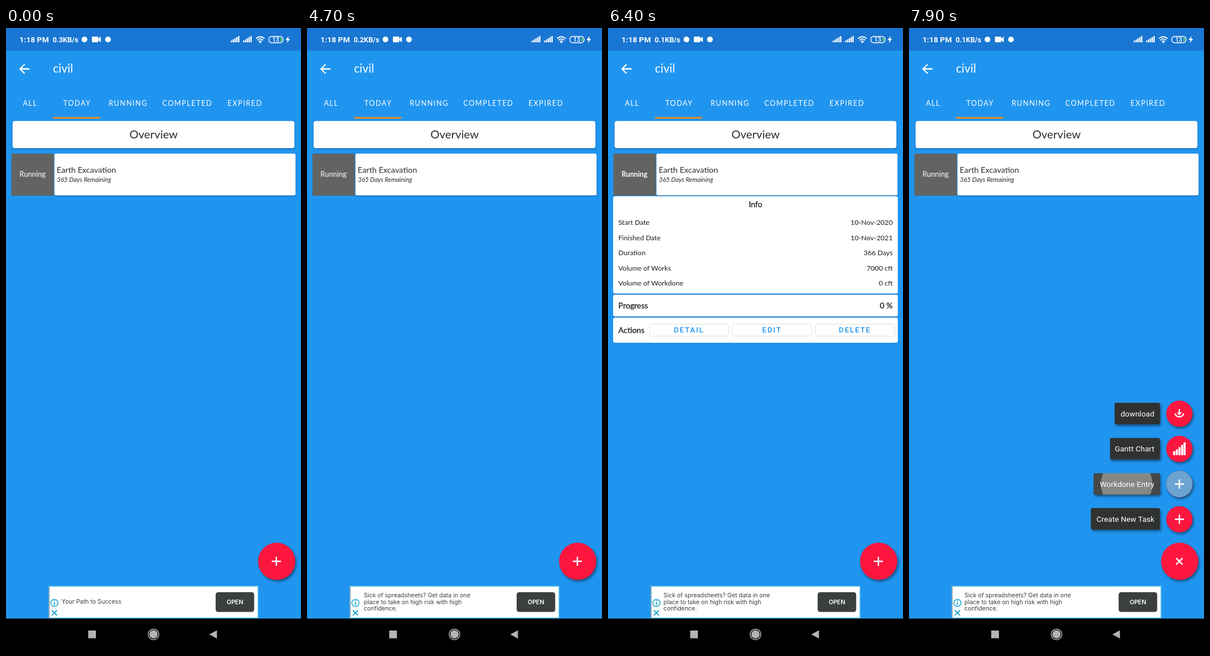
An HTML page that plays this animation: 515 px wide and 1087 px high, repeating every 8 s.

```html
<!DOCTYPE html>
<html lang="en">
<head>
<meta charset="utf-8">
<title>Task list</title>
<style>
html, body { margin: 0; width: 100%; height: 100%; overflow: hidden; background: #2095f0; }
svg, .panel { position: absolute; left: 0; top: 0; }
svg { width: 515px; height: 1087px; display: block; }
text, .panel { font-family: Lato, sans-serif; }
.roboto, .panel button { font-family: Roboto, sans-serif; }
.ad text { font: 10.4px Inter, sans-serif; fill: #3c3f3e; }
.mid { text-anchor: middle; }
.end { text-anchor: end; }
.tabs text { font-size: 12.5px; letter-spacing: 1.4px; fill: #fff; }
.line { fill: none; stroke: #fff; }
.card { fill: #fefffe; filter: drop-shadow(0 1px 1px rgba(0,30,80,.5)); }
.raised { filter: drop-shadow(2px 3px 2px rgba(0,0,0,.45)); }
.red { fill: #fd173f; }

/* every track shares one 8 s clock */
.run { animation: 8s linear infinite; }
.speed-a { animation-name: speedA; }
.speed-b { animation-name: speedB; }
.speed-c { animation-name: speedC; }
.idle { animation-name: idle; }
.active { animation-name: active; }
.slide { animation-name: slide; }
.menu { animation-name: menu; }
.turn { animation-name: turn; transform-box: fill-box; transform-origin: center; }
.pop { animation-name: pop; transform-box: fill-box; transform-origin: center; }
.tag { animation-name: tag; }
.press { animation-name: press; }
.ripple { animation-name: ripple; }
.item:nth-child(2) .run { animation-delay: 50ms; }
.item:nth-child(3) .run { animation-delay: 100ms; }
.item:nth-child(4) .run { animation-delay: 150ms; }
.item .run { animation-fill-mode: backwards; }

@keyframes speedA { 0%, 11.24% { opacity: 1 } 11.25%, 100% { opacity: 0 } }
@keyframes speedB { 0%, 11.24% { opacity: 0 } 11.25%, 61.24% { opacity: 1 } 61.25%, 100% { opacity: 0 } }
@keyframes speedC { 0%, 61.24% { opacity: 0 } 61.25%, 100% { opacity: 1 } }
@keyframes idle { 0%, 60.62% { opacity: 1 } 60.63%, 83.12% { opacity: 0 } 83.13%, 100% { opacity: 1 } }
@keyframes active { 0%, 60.62% { opacity: 0 } 60.63%, 83.12% { opacity: 1 } 83.13%, 100% { opacity: 0 } }
@keyframes slide {
  0%, 52.5% { transform: none; animation-timing-function: cubic-bezier(.25,1,.5,1) }
  61.25%, 100% { transform: translateX(-267px) }
}
@keyframes unfold {
  0%, 60.625% { height: 0; animation-timing-function: cubic-bezier(.37,0,.63,1) }
  64.375%, 79.375% { height: 275px; animation-timing-function: cubic-bezier(.37,0,.63,1) }
  83.125%, 100% { height: 0 }
}
@keyframes menu { 0%, 87.49% { visibility: hidden } 87.5%, 100% { visibility: visible } }
@keyframes turn {
  0%, 87.5% { transform: none; animation-timing-function: cubic-bezier(.3,1.3,.6,1.2) }
  91.25%, 100% { transform: rotate(-135deg) }
}
@keyframes pop {
  0%, 87.5% { transform: scale(0); animation-timing-function: cubic-bezier(.3,1.2,.6,1.1) }
  90%, 100% { transform: none }
}
@keyframes tag {
  0%, 87.5% { transform: translateX(40px); opacity: 0; animation-timing-function: ease-out }
  90%, 100% { transform: none; opacity: 1 }
}
@keyframes press { 0%, 95.5% { opacity: 0 } 96.5%, 100% { opacity: 1 } }
@keyframes ripple {
  0%, 95.6% { r: 8px; opacity: 0 }
  96.4% { opacity: 1 }
  98.75% { r: 45px; opacity: 1 }
  100% { r: 52px; opacity: 1 }
}

.panel {
  left: 9px; top: 294px; width: 497px; height: 0; overflow: hidden;
  display: flex; flex-direction: column; gap: 2px;
  font-size: 12.2px; color: #1c1e1c; background: #1b7fd2; border-radius: 3px;
  animation: unfold 8s linear infinite;
}
.panel > div { box-sizing: border-box; background: #fefffe; border-radius: 3px; flex: none; }
.info { height: 170px; padding: 0 9px; }
.info h2 { margin: 0 0 4px; font: 13.6px/29px Lato, sans-serif; text-align: center; }
.panel h2, .panel b { -webkit-text-stroke: .3px; }
.info p { margin: 0; display: flex; justify-content: space-between; line-height: 26.5px; }
.panel b { font-weight: 400; font-size: 13.8px; }
.panel .progress { height: 37.5px; padding: 0 9px; display: flex; align-items: center; justify-content: space-between; }
.panel .actions { flex: 1 1 0; min-height: 0; padding: 11px 5px 11px 9px; display: flex; align-items: stretch; gap: 5px; overflow: hidden; }
.actions b { width: 48.5px; align-self: center; }
.actions button {
  flex: 1; min-width: 0; padding: 0; box-sizing: border-box;
  border: 1.5px solid #dcdedc; border-radius: 5px; background: none;
  color: #2095f0; font-size: 13px; font-weight: 500; letter-spacing: 1.8px;
}
</style>
</head>
<body>
<svg viewBox="0 0 515 1087">
  <defs>
    <path id="bars" d="M1.5 25v-3M4.7 25v-5M7.9 25v-7M11.1 25v-9M14.3 25v-11" stroke="#fff" stroke-width="2.3"/>
    <path id="plus" d="M-8 0H8M0-8V8" class="line" stroke-width="2.4"/>
    <clipPath id="adClip"><rect x="94" y="978" width="267" height="51"/></clipPath>
    <clipPath id="tagClip"><rect x="322.5" y="778" width="115.5" height="37.5" rx="3"/></clipPath>
  </defs>

  <rect width="515" height="1087" fill="#2095f0"/>
  <rect width="515" height="39.5" fill="#1976d2"/>

  <g class="roboto" fill="#fff" font-weight="700">
    <text class="roboto" x="23.5" y="25" font-size="13.6">1:18 PM</text>
    <g font-size="12.4">
      <text class="roboto run speed-a" x="81.5" y="25">0.3KB/s</text>
      <text class="roboto run speed-b" x="81.5" y="25">0.2KB/s</text>
      <text class="roboto run speed-c" x="81.5" y="25">0.1KB/s</text>
    </g>
    <circle cx="137" cy="20" r="5"/>
    <circle cx="178" cy="20" r="5"/>
    <path d="M151 15h9q1 0 1 1v2.5l4.500-3.500v10l-4.500-3.500V24q0 1-1 1h-9q-1 0-1-1v-8q0-1 1-1z"/>
    <use href="#bars" x="392"/>
    <use href="#bars" x="413.5"/>
    <path class="line" stroke-width="1.7" d="M436.500 18.500q7.500-6.500 15 0M439 21.300q5-4.300 10 0M441.400 23.800q2.600-2.200 5.200 0"/>
    <circle cx="444" cy="25.300" r="1.300"/>
    <rect class="line" x="458.700" y="14.700" width="25" height="11" rx="5" stroke-width="1.400"/>
    <path d="M479 17h1q2 1 2 3.200t-2 3.200h-1z" fill="#4ed35a"/>
    <text class="roboto mid" x="471" y="24" font-size="10.5" font-weight="500">13</text>
    <path d="M493.500 14l-5.500 7h3.500l-1.500 5.500 6-7.500h-3.500z"/>
  </g>

  <path class="line" stroke-width="2.300" d="M41 71.500H25M32.500 63.500l-8 8 8 8"/>
  <text x="82" y="78" font-size="20.5" fill="#fff">civil</text>
  <g class="tabs mid">
    <text x="42.200" y="135.500">ALL</text>
    <text x="124.200" y="135.500">TODAY</text>
    <text x="213.200" y="135.500">RUNNING</text>
    <text x="316.700" y="135.500">COMPLETED</text>
    <text x="417.200" y="135.500">EXPIRED</text>
  </g>
  <rect x="82" y="155.500" width="82.500" height="3" fill="#ee8a22"/>

  <rect class="card" x="11.500" y="162.500" width="492" height="47.500" rx="4"/>
  <text class="mid" x="257.700" y="193" font-size="19.8" fill="#2b2d2b">Overview</text>

  <rect x="9.500" y="219.500" width="74" height="73.500" fill="#626462"/>
  <rect class="card" x="84.500" y="219.500" width="421" height="73" rx="2.500"/>
  <g class="mid" fill="#fff">
    <text class="run idle" x="46.300" y="260" font-size="12.7">Running</text>
    <text class="run active" x="46.300" y="260" font-size="12.3" font-weight="700">Running</text>
  </g>
  <text x="88.500" y="253" font-size="14.1" fill="#2b2d2b">Earth Excavation</text>
  <text x="89" y="269" font-size="11" font-style="italic" fill="#2b2d2b">365 Days Remaining</text>

  <g class="ad">
    <rect x="75" y="975.500" width="365" height="55.500" fill="#fefffe" stroke="#58bfe6" stroke-width="1.500"/>
    <path d="M75.500 1031V976.500" stroke="#9aa5a8" stroke-width="1.500"/>
    <g fill="none" stroke="#18a6d2" stroke-width="1.500">
      <circle cx="84.500" cy="1004.700" r="6.300"/>
      <path d="M84.500 1003.500v5M84.500 1000.300v1.800" stroke-width="2"/>
      <path d="M80 1017.500l9 9M89 1017.500l-9 9" stroke-width="1.800"/>
    </g>
    <g clip-path="url(#adClip)">
      <g class="run slide">
        <text x="97" y="1006.300">Your Path to Success</text>
        <text y="995">
          <tspan x="363.800">Sick of spreadsheets? Get data in one</tspan>
          <tspan x="363.800" dy="11.500">place to take on high risk with high</tspan>
          <tspan x="363.800" dy="11.500">confidence.</tspan>
        </text>
      </g>
    </g>
    <rect x="366" y="986" width="67.300" height="34.500" rx="4.500" fill="#3c403d"/>
    <text class="mid" x="399.600" y="1007" style="fill:#fff;font-weight:600">OPEN</text>
  </g>

  <g class="run menu">
    <g class="item">
      <g class="run tag"><rect class="raised" x="317.500" y="839" width="120.500" height="37.500" rx="3" fill="#30322f"/>
        <text class="roboto end" x="428.300" y="863" font-size="13.5" fill="#fff">Create New Task</text></g>
      <g class="run pop raised"><circle class="red" cx="472" cy="858.500" r="23"/><use href="#plus" x="472" y="858.500"/></g>
    </g>
    <g class="item">
      <g class="run tag">
        <rect class="raised" x="322.500" y="778" width="115.500" height="37.500" rx="3" fill="#30322f"/>
        <g clip-path="url(#tagClip)">
          <rect class="run press" style="animation-delay:0s" x="322.500" y="778" width="115.500" height="37.500" fill="#464846"/>
          <circle class="run ripple" style="animation-delay:0s" cx="380" cy="797" r="8" fill="#858785"/>
        </g>
        <text class="roboto end" x="428.300" y="801.700" font-size="13.6" fill="#fff">Workdone Entry</text>
      </g>
      <g class="run pop raised"><circle class="red" cx="472" cy="797" r="23"/>
        <circle class="run press" style="animation-delay:0s" cx="472" cy="797" r="23" fill="#6da3d0"/>
        <use href="#plus" x="472" y="797"/></g>
    </g>
    <g class="item">
      <g class="run tag"><rect class="raised" x="351" y="716.500" width="87" height="37.500" rx="3" fill="#30322f"/>
        <text class="roboto end" x="428.300" y="740.200" font-size="13.5" fill="#fff">Gantt Chart</text></g>
      <g class="run pop raised"><circle class="red" cx="472" cy="735.500" r="23"/>
        <path d="M463 746.500v-7M467.600 746.500v-10M472.200 746.500v-14M476.800 746.500v-18M481.200 746.500v-22.500" stroke="#fff" stroke-width="3.700"/></g>
    </g>
    <g class="item">
      <g class="run tag"><rect class="raised" x="359" y="655" width="79" height="37.500" rx="3" fill="#30322f"/>
        <text class="roboto end" x="428.300" y="678.700" font-size="13.5" fill="#fff">download</text></g>
      <g class="run pop raised"><circle class="red" cx="472" cy="674" r="23"/>
        <path class="line" stroke-width="2.400" d="M464.500 673.500a7.600 7.200 0 0 0 15 0M472 666v8"/>
        <path d="M467.500 672h9l-4.500 5z" fill="#fff"/></g>
    </g>
  </g>

  <circle class="red raised" cx="472.500" cy="932" r="32.500"/>
  <g transform="translate(472 932)"><path class="line run turn" stroke-width="2.400" d="M-8 0H8M0-8V8"/></g>

  <rect y="1032" width="515" height="55" fill="#000"/>
  <g fill="#b3b3b3">
    <rect x="143.500" y="1053" width="13.500" height="13.500"/>
    <circle cx="257.500" cy="1059.700" r="7.200"/>
    <circle cx="257.500" cy="1059.700" r="9.300" fill="none" stroke="#b3b3b3" stroke-width="1.500"/>
    <path d="M355 1059.700l13.300-7.300v14.600z"/>
  </g>
</svg>

<div class="panel">
  <div class="info">
    <h2>Info</h2>
    <p><span>Start Date</span><span>10-Nov-2020</span></p>
    <p><span>Finished Date</span><span>10-Nov-2021</span></p>
    <p><span>Duration</span><span>366 Days</span></p>
    <p><span>Volume of Works</span><span>7000 cft</span></p>
    <p><span>Volume of Workdone</span><span>0 cft</span></p>
  </div>
  <div class="progress"><b>Progress</b><b>0 %</b></div>
  <div class="actions"><b>Actions</b><button>DETAIL</button><button>EDIT</button><button>DELETE</button></div>
</div>
</body>
</html>
```
